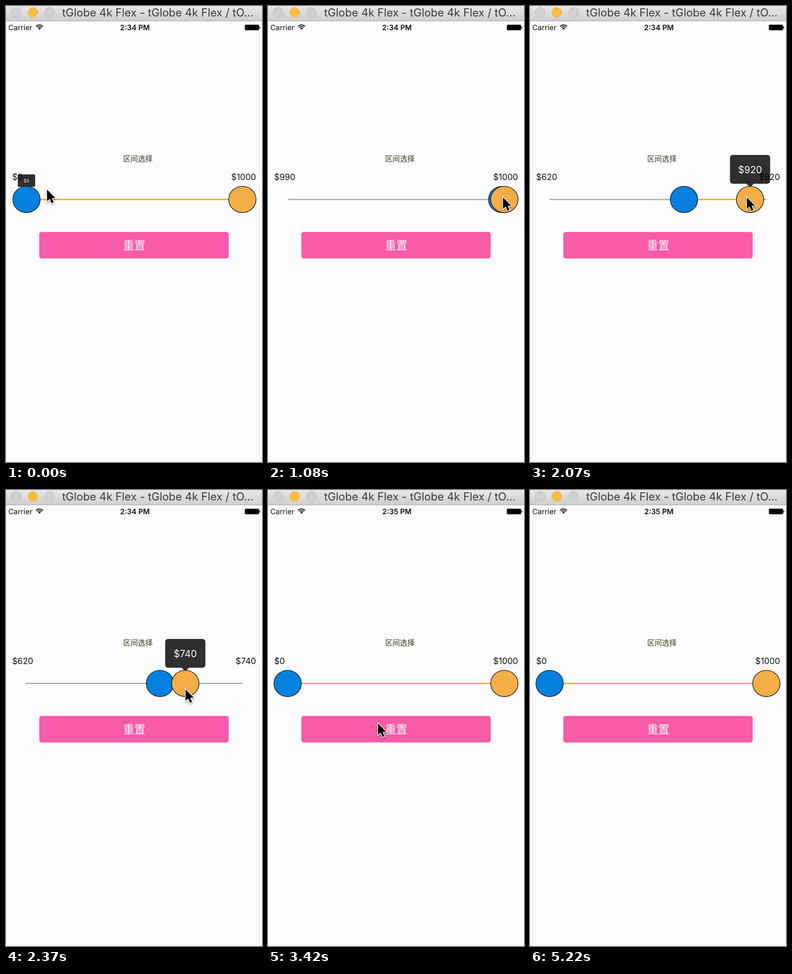
Animation, 561 px wide and 998 px high, one loop 5.25 s. Source, as an HTML page with a canvas:

```html
<!DOCTYPE html>
<html lang="zh-CN">
<head>
<meta charset="utf-8">
<title>Range slider</title>
<style>
html, body { margin: 0; width: 100%; height: 100%; overflow: hidden; background: #fcfcfe; }
canvas { display: block; }
</style>
</head>
<body>
<canvas id="stage" width="561" height="998"></canvas>
<script>
const c = document.getElementById('stage').getContext('2d');
const LOOP = 5250, TICK = 30, RESET = 3330, TRACK_Y = 423.4;
const LATIN = 'Inter, Roboto, sans-serif';
const CJK = '"Noto Sans CJK SC", "Noto Sans CJK", sans-serif';

// Pointer gestures: a drag also carries its knob to a value, otherwise everything rests.
const gestures = [
  { start: 0, end: 960, x: 514, y: 418, knob: 'low', value: 990 },
  { start: 1200, end: 1600, x: 342, y: 420, knob: 'low', value: 620 },
  { start: 1600, end: 1740, x: 507, y: 411 },
  { start: 1950, end: 2540, x: 346, y: 445, knob: 'high', value: 630 },
  { start: 2540, end: 2700, x: 324, y: 422 },
  { start: 2700, end: 3000, x: 219, y: 421, knob: 'low', value: 400 },
  { start: 3060, end: 3300, x: 240, y: 510 },
  { start: 3780, end: 3990, x: 258, y: 621 }
];

const clamp = v => Math.min(1, Math.max(0, v));
const toX = v => 43 + v * .475;
const money = v => '$' + Math.round(v / 10) * 10;

function stateAt(t) {
  const s = { x: 89, y: 401, low: 4, high: 1000, tip: { low: 0, high: 0 } };
  for (const g of gestures) {
    const p = clamp((t - g.start) / (g.end - g.start));
    s.x += (g.x - s.x) * p;
    s.y += (g.y - s.y) * p;
    if (!g.knob) continue;
    s[g.knob] += (g.value - s[g.knob]) * p;
    // The tooltip pops up on press and shrinks after release.
    const scale = Math.min(clamp((t - g.start + 39) / 90), clamp((g.end + 120 - t) / 90));
    s.tip[g.knob] = Math.max(s.tip[g.knob], scale);
  }
  return t < RESET ? s : { ...s, low: 0, high: 1000 };
}

function text(s, x, y, size, color = '#111', align = 'left', family = LATIN, weight = 400) {
  c.font = `${weight} ${size}px ${family}`;
  c.fillStyle = color;
  c.textAlign = align;
  c.fillText(s, x, y);
}

function box(x, y, w, h, r, color) {
  c.fillStyle = color;
  c.beginPath();
  c.roundRect(x, y, w, h, r);
  c.fill();
}

function oval(x, y, rx, ry, fill, stroke, width) {
  c.beginPath();
  c.ellipse(x, y, rx, ry, 0, 0, 7);
  c.fillStyle = fill;
  c.fill();
  c.strokeStyle = stroke;
  c.lineWidth = width;
  c.stroke();
}

function line(x1, x2, color) {
  c.fillStyle = color;
  c.fillRect(x1, 422, x2 - x1, 3);
}

function wifi(x, y) {
  c.strokeStyle = c.fillStyle = '#111';
  c.lineWidth = 2;
  for (const r of [6.7, 10.5]) {
    c.beginPath();
    c.arc(x, y, r, -Math.PI * .76, -Math.PI * .24);
    c.stroke();
  }
  c.beginPath();
  c.moveTo(x, y);
  c.arc(x, y, 4, -Math.PI * .76, -Math.PI * .24);
  c.fill();
}

function windowBar(t) {
  const g = c.createLinearGradient(0, 0, 0, 32);
  g.addColorStop(0, '#e8e7e8');
  g.addColorStop(1, '#d0cfd0');
  c.fillStyle = g;
  c.fillRect(0, 0, 561, 32);
  c.fillStyle = '#aeadae';
  c.fillRect(0, 32, 561, 1.3);
  ['#d0cfd1', '#fdbd3e', '#d0cfd1'].forEach((color, i) =>
    oval(22 + i * 36.7, 14, 10.7, 10.7, color, i === 1 ? '#eaae40' : '#b8b7b9', 1));
  text('tGlobe 4k Flex - tGlobe 4k Flex / tO...', 123, 23, 24, '#3c3b3c');

  text('Carrier', 5, 53, 16.2);
  wifi(73.5, 52);
  text(t < 2700 ? '2:34 PM' : '2:35 PM', 282.5, 53, 16, '#111', 'center', LATIN, 600);
  box(523, 40.5, 32, 13, 3, '#777');
  box(524, 41.5, 30, 11, 2, '#000');
  box(555, 44.5, 2, 5, 1, '#333');
}

function tooltip(v, scale) {
  if (scale <= 0) return;
  c.save();
  c.translate(toX(v), 401);
  c.scale(scale, scale);
  c.beginPath();
  c.roundRect(-44, -75, 88, 63, 6);
  c.moveTo(-8, -12);
  c.lineTo(8, -12);
  c.lineTo(0, -4);
  c.closePath();
  c.fillStyle = 'rgba(0,0,0,.81)';
  c.fill();
  text(money(v), 0, -35.5, 21, '#fff', 'center');
  c.restore();
}

function cursor(x, y) {
  c.save();
  c.translate(x + 1, y + 1);
  c.beginPath();
  [[0, 0], [0, 25], [5.8, 20], [10, 29.5], [14.4, 27.5], [10.4, 18.5], [18, 18]]
    .forEach(p => c.lineTo(...p));
  c.closePath();
  c.lineWidth = 3;
  c.strokeStyle = '#fff';
  c.shadowColor = 'rgba(0,0,0,.4)';
  c.shadowBlur = 4;
  c.shadowOffsetY = 2;
  c.stroke();
  c.shadowColor = 'transparent';
  c.fillStyle = '#000';
  c.fill();
  c.restore();
}

function draw(t) {
  const { x, y, low, high, tip } = stateAt(t);
  c.fillStyle = '#fcfcfe';
  c.fillRect(0, 0, 561, 998);
  windowBar(t);

  text('区间选择', 289, 340, 16.2, '#333a18', 'center', CJK);
  text(money(low), 13.5, 381, 18.5);
  text(money(high), 548, 381, 18.5, '#111', 'right');

  line(43, 518, '#b4b3aa');
  line(toX(low), toX(high), '#fbae3c');
  tooltip(low, tip.low);
  tooltip(high, tip.high);
  oval(toX(low), TRACK_Y, 30, 28.8, '#0580df', '#111', 1.4);
  oval(toX(high), TRACK_Y, 30, 28.8, '#f4ae48', '#111', 1.4);

  box(73, 494.5, 415, 58, 5, '#f85ba7');
  text('重置', 281, 533, 24.5, '#fff', 'center', CJK);
  if (t < 4020) cursor(x, y);
}

const start = performance.now();
function frame(now) {
  const t = Math.max(0, now - start) % LOOP;
  draw(Math.floor(t / TICK) * TICK);
  requestAnimationFrame(frame);
}
draw(0);
requestAnimationFrame(frame);
</script>
</body>
</html>
```
